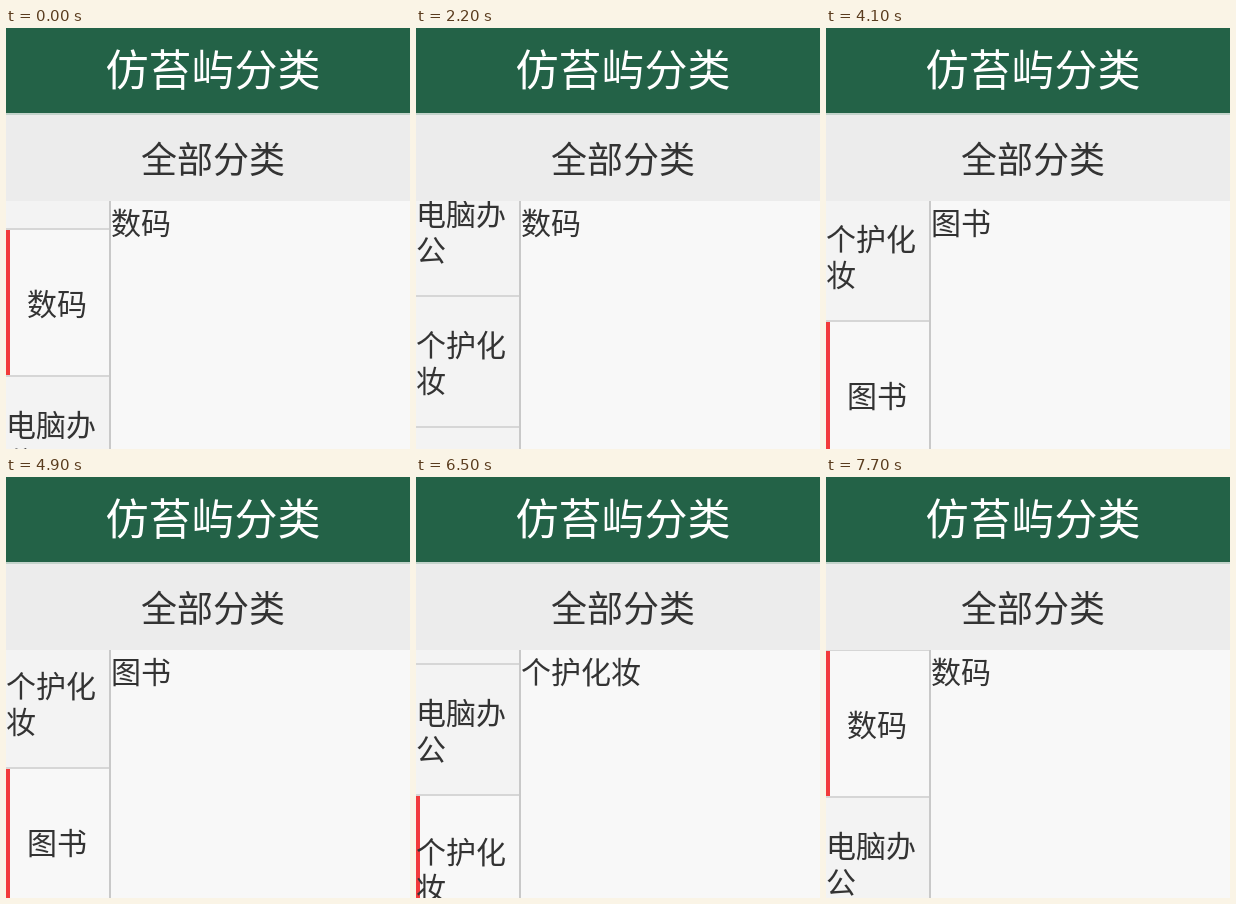
Animation of 404 by 421 pixels, one loop 9100 ms. Source, as an HTML page with a canvas:

```html
<!DOCTYPE html>
<html lang="zh-CN">
<head>
<meta charset="utf-8">
<style>
html, body { margin: 0; width: 100%; height: 100%; overflow: hidden; }
canvas { display: block; }
</style>
</head>
<body>
<canvas width="404" height="421"></canvas>
<script>
const ctx = document.querySelector('canvas').getContext('2d');
const LOOP = 9100, TICK = 100, LIST_TOP = 173, LIST_WIDTH = 103;
const items = ['数码', '电脑办公', '个护化妆', '图书'];

// Swipes move the list in ticks; taps select an item and may shift the list.
const events = [
  { at: 0, y: 202, pick: 0 },
  { at: 1400, y: 0, ticks: 4 },
  { at: 2200, y: -106, ticks: 4 },
  { at: 3100, y: -115, ticks: 6 },
  { at: 4100, y: -99, pick: 3 },
  { at: 4800, y: -115, ticks: 7 },
  { at: 5700, y: -115, pick: 2 },
  { at: 6200, y: 57, ticks: 4 },
  { at: 6900, y: 174, ticks: 3 },
  { at: 7700, y: 174, pick: 0 },
];

const ease = p => (p * p * (3 - 2 * p)) ** (4 / 3);

function stateAt(time) {
  let y = 0, selected = 0;
  for (const { at, y: target, ticks = 1, pick = selected } of events) {
    if (time < at) break;
    const step = Math.min(ticks, Math.floor((time - at) / TICK) + 1);
    y += (target - y) * ease(step / ticks);
    selected = pick;
  }
  return { y: Math.round(y), selected };
}

function rect(color, x, y, w, h) {
  ctx.fillStyle = color;
  ctx.fillRect(x, y, w, h);
}

function text(str, x, centerY, size, align = 'center', color = '#333') {
  ctx.font = `${size}px "Noto Sans CJK SC", "Noto Sans CJK", sans-serif`;
  ctx.textAlign = align;
  ctx.fillStyle = color;
  ctx.fillText(str, x, Math.round(centerY + size * 0.38));
}

function drawItem(label, y, height, active) {
  if (active) {
    rect('#f8f8f8', 0, y, LIST_WIDTH, height);
    rect('#f23a3a', 0, y, 4, height - 2);
  }
  rect('#d6d6d6', 0, y + height - 2, LIST_WIDTH, 2);
  const middle = y + height / 2;
  if (label.length > 3) {
    text(label.slice(0, 3), 0, middle - 18, 30, 'left');
    text(label.slice(3), 0, middle + 18, 30, 'left');
  } else {
    text(label, 51, middle, 30);
  }
}

function draw(time) {
  const { y, selected } = stateAt(time);
  rect('#f8f8f8', 0, 0, 404, 421);
  rect('#f3f3f3', 0, LIST_TOP, LIST_WIDTH, 248);
  rect('#d6d6d6', 0, y - 2, LIST_WIDTH, 2);
  let top = y;
  items.forEach((label, i) => {
    const height = i === selected ? 147 : 131;
    drawItem(label, top, height, i === selected);
    top += height;
  });
  rect('#c9c9c9', 103, LIST_TOP, 2, 248);
  text(items[selected], 105, 195, 30, 'left');

  rect('#236247', 0, 0, 404, 85);
  rect('#c3d3cb', 0, 85, 404, 2);
  rect('#ececec', 0, 87, 404, LIST_TOP - 87);
  text('仿苔屿分类', 207, 42, 43, 'center', '#fff');
  text('全部分类', 207, 131, 36);
}

function frame() {
  draw(performance.now() % LOOP);
  requestAnimationFrame(frame);
}
frame();
</script>
</body>
</html>
```
